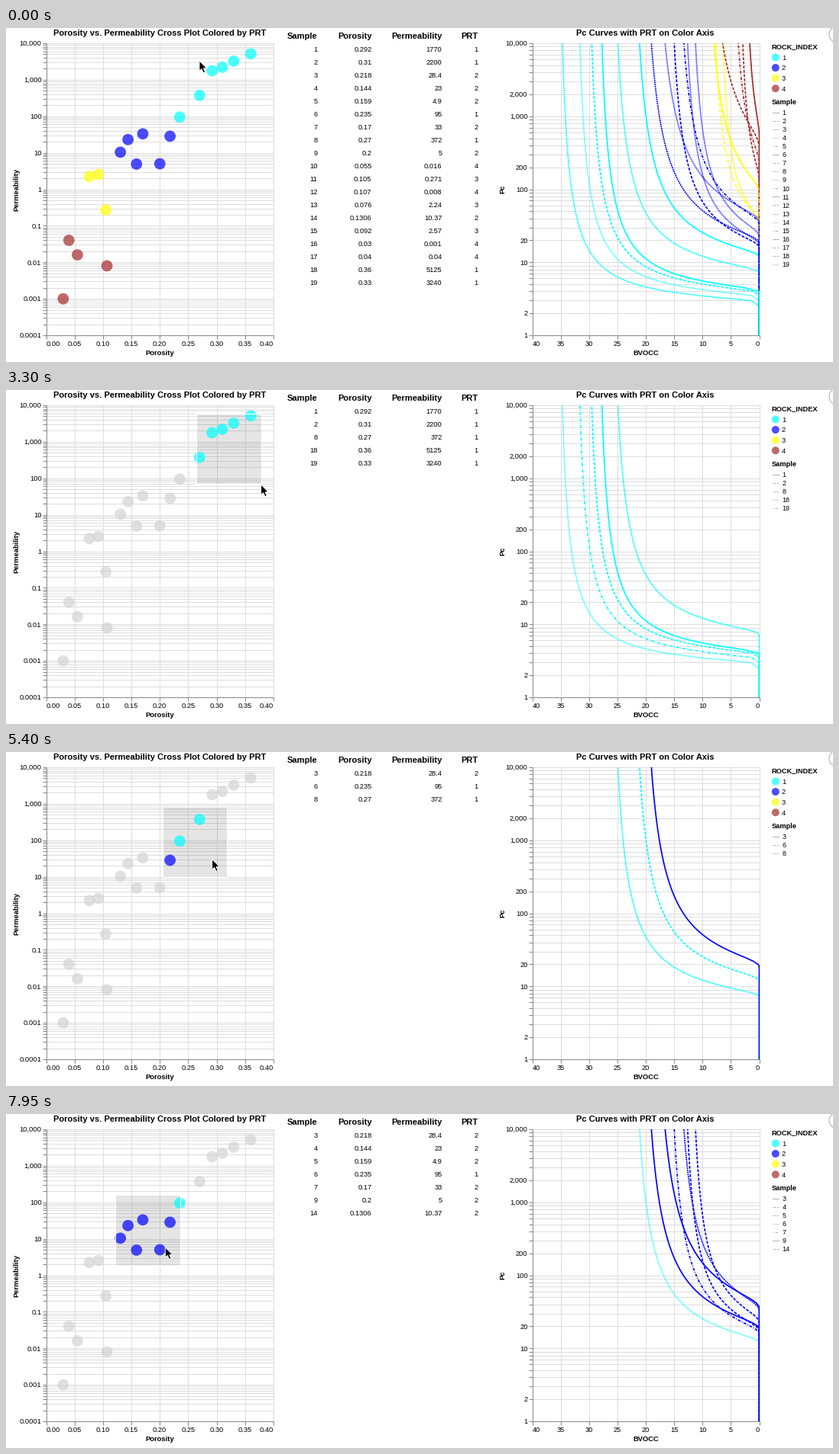
A matplotlib script for the animation above (8000 ms loop, 1082 by 438 pixels).

```python
import numpy as np
import matplotlib.pyplot as plt
from matplotlib.animation import FuncAnimation
from matplotlib.collections import LineCollection
from matplotlib.patches import Circle, Polygon, Rectangle

W, H, DPI = 1082, 438, 64
PX = 72 / DPI  # points per pixel
STEP, TICK, LOOP = 150, 50, 8000

plt.rcParams["font.family"] = ["Liberation Sans", "DejaVu Sans"]
plt.rcParams["lines.scale_dashes"] = False

COLORS = ["#00ffff", "#0000ff", "#ffff00", "#a52a2a"]
DASHES = [None, (4, 2), (2, 1), (1, 1), (1, 2, 4, 2)]

# Measured samples; everything else follows from these two columns
por = np.array([0.292, 0.31, 0.218, 0.144, 0.159, 0.235, 0.17, 0.27, 0.2, 0.055,
                0.105, 0.107, 0.076, 0.1306, 0.092, 0.03, 0.04, 0.36, 0.33])
perm = np.array([1770, 2200, 28.4, 23, 4.9, 95, 33, 372, 5, 0.016,
                 0.271, 0.008, 2.24, 10.37, 2.57, 0.001, 0.04, 5125, 3240])
COUNT = len(por)
rock = (perm < 50).astype(int) + (perm < 4) + (perm < 0.1)

TOP, BOTTOM = 20, 403
LEFT1, RIGHT1 = 52.5, 350.0
LEFT2, RIGHT2 = 688.5, 985.5


def por_x(v):
    return LEFT1 + v / 0.4 * (RIGHT1 - LEFT1)


def perm_y(v):
    return TOP + (4 - np.log10(v)) / 8 * (BOTTOM - TOP)


def bv_x(v):
    return RIGHT2 - v / 40 * (RIGHT2 - LEFT2)


def pc_y(v):
    return BOTTOM - np.log10(v) / 4 * (BOTTOM - TOP)


fig = plt.figure(figsize=(W / DPI, H / DPI), dpi=DPI, facecolor="white")
ax = fig.add_axes([0, 0, 1, 1])
ax.set_xlim(0, W)
ax.set_ylim(H, 0)
ax.axis("off")


def text(x, y, s, size=9.2, ha="left", bold=False):
    """Text whose capitals are centred on y."""
    return ax.text(x, y + 0.36 * size, s, fontsize=size * PX, ha=ha, va="baseline",
                   color="black", weight="bold" if bold else "normal", zorder=6)


def side_title(x, y, s):
    ax.text(x, y, s, fontsize=9.4 * PX, weight="bold", rotation=90, ha="center",
            va="baseline", rotation_mode="anchor", zorder=6)


def segments(lines, color, z):
    ax.add_collection(LineCollection(lines, colors=color, linewidths=PX, zorder=z),
                      autolim=False)


def draw_axes(left, right, xs, ys):
    grid = [[(x, TOP), (x, BOTTOM)] for x in xs] + [[(left, y), (right, y)] for y in ys]
    ticks = [[(x, BOTTOM), (x, BOTTOM + 5)] for x in xs]
    ticks += [[(left - 5, y), (left, y)] for y in ys]
    domain = [[(left, TOP), (left, BOTTOM)], [(left, BOTTOM), (right, BOTTOM)]]
    segments(grid, "#dddddd", 0)
    segments(ticks + domain, "#888888", 1)


def x_labels(xs, names):
    last = len(xs) - 1
    for i, (x, name) in enumerate(zip(xs, names)):
        ha = "left" if i == 0 else "right" if i == last else "center"
        text(x, 413.7, name, ha=ha)


def log_ticks(low, high):
    return [m * 10.0 ** e for e in range(low, high) for m in range(1, 10)] + [10.0 ** high]


# Cross plot frame
por_ticks = np.arange(9) * 0.05
draw_axes(LEFT1, RIGHT1, por_x(por_ticks), [perm_y(v) for v in log_ticks(-4, 4)])
x_labels(por_x(por_ticks), [f"{v:.2f}" for v in por_ticks])
for e in range(-4, 5):
    text(46.5, perm_y(10.0 ** e), f"{10.0 ** e:,.{max(0, -e)}f}", ha="right")
text(201.5, 6, "Porosity vs. Permeability Cross Plot Colored by PRT", 11.1, "center", True)
text(201.5, 426, "Porosity", 9.4, "center", True)
side_title(16, 211.5, "Permeability")

# Pressure curve frame
bv_ticks = np.arange(40, -1, -5)
draw_axes(LEFT2, RIGHT2, bv_x(bv_ticks), [pc_y(v) for v in log_ticks(0, 4)])
x_labels(bv_x(bv_ticks), [str(v) for v in bv_ticks])
for v in (1, 2, 10, 20, 100, 200, 1000, 2000, 10000):
    text(682.5, pc_y(v), f"{v:,}", ha="right")
text(836.5, 6, "Pc Curves with PRT on Color Axis", 11.1, "center", True)
text(837, 426, "BVOCC", 9.4, "center", True)
side_title(652, 211.5, "Pc")

# Table
COLUMNS = {"Sample": 407.5, "Porosity": 478.5, "Permeability": 570.5, "PRT": 617.5}
for name, x in COLUMNS.items():
    text(x, 10.5, name, 11.1, "right", True)
cells = [[text(x, 28 + 17 * r, "", 9.3, "right") for x in COLUMNS.values()]
         for r in range(COUNT)]

# Legends
text(1001.5, 24, "ROCK_INDEX", 9.3, bold=True)
for i, color in enumerate(COLORS):
    y = 38.5 + 13.6 * i
    ax.add_patch(Circle((1006.8, y), 5, fc=color, alpha=0.7, lw=0, zorder=2))
    text(1015, y, str(i + 1))
text(1001.5, 97, "Sample", 9.3, bold=True)


def dash_style(rank):
    dash = DASHES[rank % len(DASHES)]
    return "-" if dash is None else (0, tuple(d * 0.93 * PX for d in dash))


keys, key_names = [], []
for r in range(COUNT):
    y = 110.8 + 11.06 * r
    keys += ax.plot([1002.5, 1011], [y, y], color="#aaaaaa", lw=0.9 * PX,
                    ls=dash_style(r), dash_capstyle="butt", zorder=2)
    key_names.append(text(1015.5, y, "", 8.9))

# Corner button, mostly off stage
ax.add_patch(Circle((1088, 8.5), 11, fc="white", ec="#aaaaaa", lw=PX, zorder=4))

# Thomeer curves, with shape and entry pressure set by rock quality
quality = np.log10(perm / por)
shape = 0.64 - 0.122 * quality
entry = 10 ** (2.03 - 0.384 * quality)
pressure = np.union1d(np.arange(1, 20, 0.5), np.logspace(1.3, 4, 60))
curves = []
for i in range(COUNT):
    ratio = np.maximum(np.log10(pressure / entry[i]), 1e-3)
    bv = 100 * por[i] * np.exp(-shape[i] / ratio)
    curves += ax.plot(bv_x(bv), pc_y(pressure), color=COLORS[rock[i]], lw=1.7 * PX,
                      dash_capstyle="butt", solid_capstyle="butt", zorder=3 - i * 0.01)
    curves[i].set_clip_path(Rectangle((LEFT2, TOP), RIGHT2 + 0.5 - LEFT2, BOTTOM - TOP,
                                      transform=ax.transData))

# Scatter, brush and pointer
px, py = por_x(por), perm_y(perm)
dots = ax.scatter(px, py, s=(14.8 * PX) ** 2, linewidths=0, alpha=0.7, zorder=2)
dots.set_snap(False)
brush_fill = ax.add_patch(Rectangle((0, 0), 1, 1, fc="#333333", alpha=0.125, lw=0, zorder=1.5))
brush_edge = ax.add_patch(Rectangle((0, 0), 1, 1, fc="none", ec="white", lw=PX, zorder=4))
ARROW = np.array([(0, 0), (0, 13.4), (3, 10.7), (5.3, 15.8), (7.6, 14.8), (5.4, 9.9), (9.5, 9.6)])
pointer = ax.add_patch(Polygon(ARROW, closed=True, fc="black", ec="white", lw=0.9 * PX, zorder=8))

REST, START = np.array([253, 43]), np.array([248.5, 32])
ORIGIN = np.array([249, 31])
FIRST, FULL = np.array([4, 11]), np.array([84.5, 91.7])  # brush size at press and release
TRAIL = np.array([1.5, 3])    # pointer ahead of the growing corner
GRIP = np.array([65.2, 68.7])  # pointer inside the brush while it is moved
ARRIVE, PRESS, RELEASE, LEAVE, GRAB = 600, 1050, 2100, 3150, 3750
DRAG_T = [GRAB, 4500, 5400, 6450, 7050]
DRAG_X = [249, 231, 204.5, 158, 143.1]
DRAG_Y = [31, 54, 72, 98.5, 106]


def progress(t, start, end):
    return min(max((t - start) / (end - start), 0), 1)


def brush_at(t):
    """Corner and size of the brush."""
    size = FIRST + (FULL - FIRST) * progress(t, PRESS, RELEASE)
    corner = np.array([np.interp(t, DRAG_T, DRAG_X), np.interp(t, DRAG_T, DRAG_Y)])
    return corner, size


def pointer_at(t):
    if t < PRESS:
        return REST + (START - REST) * progress(t, 0, ARRIVE)
    corner, size = brush_at(t)
    outer, inner = corner + size + TRAIL, corner + GRIP
    return outer + (inner - outer) * progress(t, LEAVE, GRAB) ** 2


def update(n):
    t = n * TICK // STEP * STEP
    brushed = t >= PRESS
    (x, y), (w, h) = brush_at(t)
    inside = (px >= x) & (px <= x + w) & (py >= y) & (py <= y + h) | (not brushed)
    for patch in (brush_fill, brush_edge):
        patch.set_bounds(x, y, w, h)
        patch.set_visible(brushed)
    pointer.set_xy(ARROW + pointer_at(t))

    dots.set_facecolor([COLORS[k] if on else "#d3d3d3" for k, on in zip(rock, inside)])
    for curve, on in zip(curves, inside):
        curve.set_visible(bool(on))

    chosen = np.flatnonzero(inside)
    for r in range(COUNT):
        shown = r < len(chosen)
        row = [""] * len(COLUMNS)
        if shown:
            i = chosen[r]
            row = [f"{v:g}" for v in (i + 1, por[i], perm[i], rock[i] + 1)]
            curves[i].set_linestyle(dash_style(r))
        for cell, s in zip(cells[r], row):
            cell.set_text(s)
        keys[r].set_visible(shown)
        key_names[r].set_text(row[0])
    return []


anim = FuncAnimation(fig, update, frames=LOOP // TICK, interval=TICK,
                     init_func=lambda: update(0), repeat=True, blit=False)
plt.show()
```
